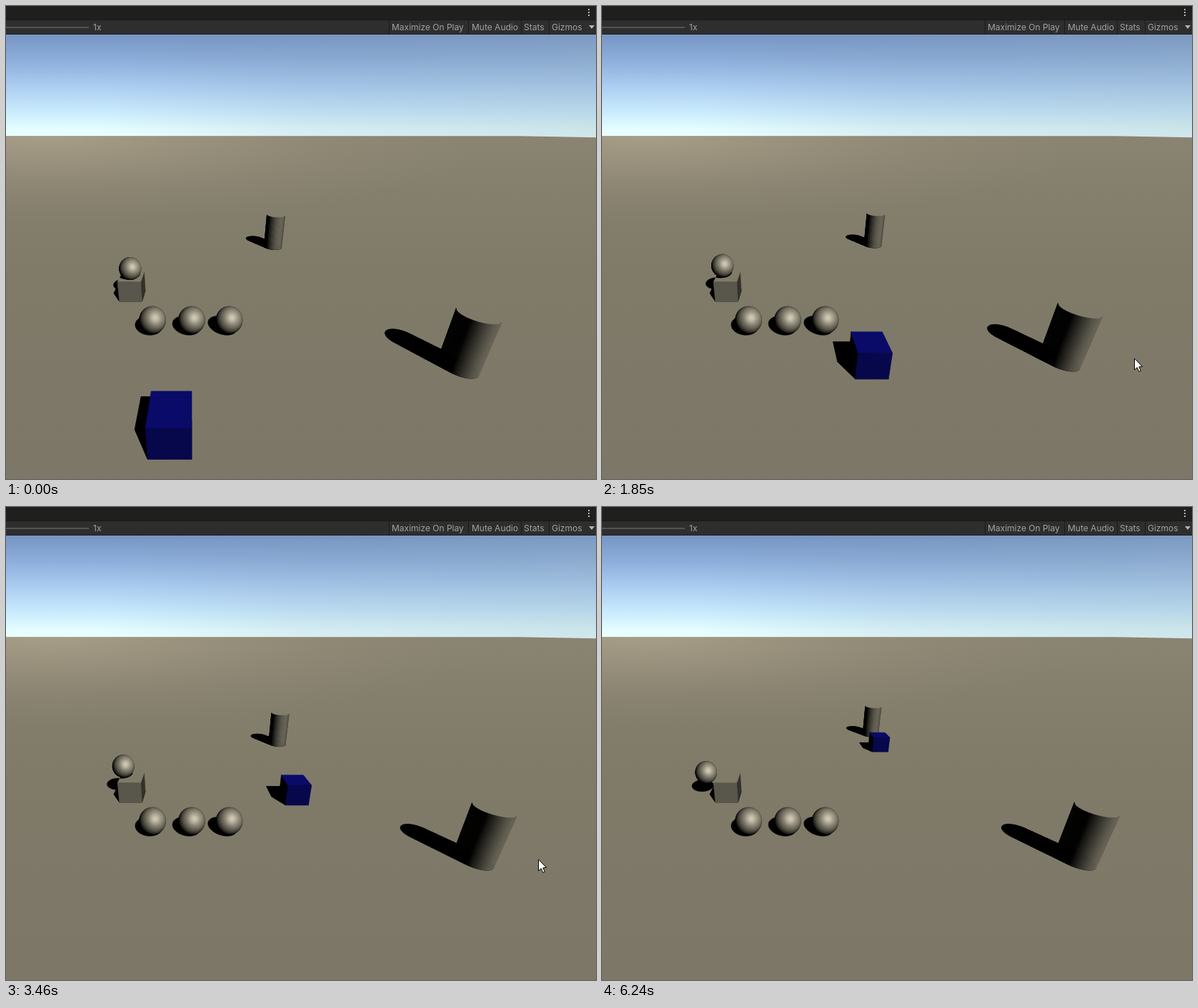
An HTML page with a canvas that plays this animation: 826 px wide and 663 px high, repeating every 6310 ms.

```html
<!DOCTYPE html>
<html lang="en">
<head>
<meta charset="utf-8">
<title>Game view</title>
<style>
  html, body { margin: 0; width: 100%; height: 100%; overflow: hidden; background: #1f1f1e; }
  #stage { position: relative; width: 826px; height: 663px; overflow: hidden; }
  canvas { position: absolute; left: 0; top: 0; }
  .bar { position: absolute; left: 0; top: 19px; width: 826px; height: 21px; background: #2e2e2e;
         border-top: 1px solid #191919; border-bottom: 1px solid #202020; box-sizing: border-box;
         font: 12px/20px Inter, sans-serif; color: #a2a2a2; white-space: nowrap; }
  .bar span { position: absolute; top: 0; }
  .bar i { position: absolute; top: 0; width: 1px; height: 19px; background: #1b1b1b; }
  .slider { position: absolute; left: 0; top: 9px; width: 116px; height: 2px; background: #535353; }
  .arrow { position: absolute; left: 815.5px; top: 7px; border: 4.5px solid transparent;
           border-top: 5px solid #b4b4b4; border-bottom: 0; }
  .dot { position: absolute; left: 815px; width: 2px; height: 2px; background: #b8b8b8; }
</style>
</head>
<body>
<div id="stage">
  <canvas id="view" width="826" height="663"></canvas>
  <b class="dot" style="top:4px"></b><b class="dot" style="top:8px"></b><b class="dot" style="top:12px"></b>
  <div class="bar">
    <div class="slider"></div>
    <span style="left:122px">1x</span>
    <i style="left:536px"></i><span style="left:540px">Maximize On Play</span>
    <i style="left:647px"></i><span style="left:652px">Mute Audio</span>
    <i style="left:721px"></i><span style="left:725px">Stats</span>
    <i style="left:760px"></i><span style="left:764px">Gizmos</span>
    <div class="arrow"></div>
  </div>
</div>
<script>
const LOOP = 6310, STEP = 77, LAST = 81;
const W = 826, H = 663, HORIZON = 182;
const LIGHT = [0.321, 0.766, -0.557];
const GRAY = [160, 154, 134], BLUE = [13, 13, 136], TOP_GRAY = '#807a69';
const ctx = document.getElementById('view').getContext('2d');

// Tracks: [time, x, z]
const cubeTrack = [[700, -1, 4.64], [1380, 0.89, 6.26], [2310, 3.17, 7.77], [2770, 3.75, 8.82],
  [3460, 4.08, 11.28], [4920, 5.43, 16.72], [5400, 5.4, 17.74]];
const nearTrack = [[700, 8.45, 7.54], [1380, 8.67, 7.74], [2310, 9.07, 7.92], [2770, 9.27, 7.92],
  [3500, 9.27, 7.92], [4150, 9.47, 7.92]];
const farTrack = [[700, 5.36, 18.49], [1380, 5.58, 18.75], [2310, 5.81, 18.87], [3460, 5.85, 19.27],
  [4920, 6.18, 20.85], [5400, 6.2, 21.3]];
// Ball: [time, x, height, z]
const ballTrack = [[0, -2.74, 1.38, 12.1], [400, -2.78, 1.5, 12.1], [1380, -2.86, 1.5, 12.15],
  [2310, -2.96, 1.5, 12.18], [3460, -3.06, 1.5, 12.22], [5163, -3.2, 1.5, 12.3]];
const mouseTrack = [[300, 763, 663], [690, 681.5, 538], [800, 681.5, 538], [1300, 730.5, 497],
  [1400, 730.5, 497], [1700, 745.5, 494], [5850, 745.5, 494], [6080, 748, 640]];

function at(track, t) {
  let i = 0;
  while (i < track.length - 1 && track[i + 1][0] <= t) i++;
  const a = track[i], b = track[i + 1] || a;
  const k = b === a ? 0 : Math.max(0, (t - a[0]) / (b[0] - a[0]));
  return a.slice(1).map((v, j) => v + (b[j + 1] - v) * k);
}

function project(x, y, z) {
  const down = 7.128 - y, w = z + 0.362 * down;
  return [260 + 446 * x / w, HORIZON + 459 * down / w, w];
}

// Point cast along the light onto a level plane
const cast = (x, y, z, level = 0) => project(x - 0.42 * (y - level), level, z + 0.727 * (y - level));

function shade(rgb, nx, ny, nz) {
  const k = Math.max(0, LIGHT[0] * nx + LIGHT[1] * ny + LIGHT[2] * nz);
  return `rgb(${rgb.map(c => Math.round(c * k))})`;
}

function trace(points) {
  ctx.beginPath();
  points.forEach(p => ctx.lineTo(p[0], p[1]));
  ctx.closePath();
}

function poly(points, color) {
  trace(points);
  ctx.fillStyle = ctx.strokeStyle = color;
  ctx.lineWidth = 0.6;
  ctx.fill();
  ctx.stroke();
}

const ring = (n, fn) => Array.from({ length: n }, (_, i) => fn(i / n * Math.PI * 2));

function makeCube(x, z, rgb, topColor) {
  const corners = [[x, z], [x + 1, z], [x + 1, z + 1], [x, z + 1]];
  const wall = (map, i) => {
    const a = corners[i], b = corners[(i + 1) % 4];
    return [map(a[0], 0, a[1]), map(b[0], 0, b[1]), map(b[0], 1, b[1]), map(a[0], 1, a[1])];
  };
  const lid = map => corners.map(c => map(c[0], 1, c[1]));
  const flat = (a, b, c) => cast(a, b, c);
  return {
    z,
    shadow() {
      for (let i = 0; i < 4; i++) poly(wall(flat, i), '#000');
      poly(lid(flat), '#000');
    },
    draw() {
      if (x > 0) poly(wall(project, 3), shade(rgb, -1, 0, 0));
      if (x + 1 < 0) poly(wall(project, 1), shade(rgb, 1, 0, 0));
      poly(lid(project), topColor || shade(rgb, 0, 1, 0));
      poly(wall(project, 0), shade(rgb, 0, 0, -1));
    },
    lid: () => lid(project)
  };
}

function makeCylinder([x, z], size) {
  const r = size / 2, h = size * 2, n = 72;
  const strip = (map, a) => {
    const b = a + Math.PI * 2 / n;
    const p = (ang, y) => map(x + r * Math.cos(ang), y, z + r * Math.sin(ang));
    return [p(a, 0), p(b, 0), p(b, h), p(a, h)];
  };
  const flat = (a, b, c) => cast(a, b, c);
  return {
    z,
    shadow() {
      ring(n, a => poly(strip(flat, a), '#000'));
      poly(ring(n, a => cast(x + r * Math.cos(a), h, z + r * Math.sin(a))), '#000');
    },
    draw() {
      ring(n, a => {
        const m = a + Math.PI / n, c = Math.cos(m), s = Math.sin(m);
        if (c * (x + r * c) + s * (z + r * s) < 0) poly(strip(project, a), shade(GRAY, c, 0, s));
      });
    }
  };
}

function ballSprite(size) {
  const c = document.createElement('canvas');
  c.width = c.height = size;
  const g = c.getContext('2d'), img = g.createImageData(size, size), half = size / 2;
  for (let i = 0; i < size * size; i++) {
    const x = (i % size + 0.5 - half) / half, y = (half - 0.5 - Math.floor(i / size)) / half;
    const d = x * x + y * y, z = Math.sqrt(Math.max(0, 1 - d));
    const lit = Math.max(0, 0.321 * x + 0.252 * y + 0.91 * z);
    const gloss = 50 * Math.pow(Math.max(0, 0.164 * x + 0.129 * y + 0.978 * z), 14);
    GRAY.forEach((v, j) => { img.data[i * 4 + j] = v * lit + gloss; });
    img.data[i * 4 + 3] = 255 * Math.min(1, Math.max(0, (1 - Math.sqrt(d)) * half));
  }
  g.putImageData(img, 0, 0);
  return c;
}
const sprite = ballSprite(96);

function makeBall(x, y, z) {
  const outline = level => ring(40, a => {
    const c = Math.cos(a) / 2, s = Math.sin(a) / 2;
    return cast(x + c * 0.866 + s * 0.383, y - s * 0.643, z + c * 0.5 - s * 0.663, level);
  });
  return {
    z,
    shadow() { poly(outline(0), '#000'); },
    shadowOn(box) {
      ctx.save();
      trace(box.lid());
      ctx.clip();
      poly(outline(1), '#000');
      ctx.restore();
    },
    draw() {
      const [px, py, w] = project(x, y, z), rx = 226 / w, ry = rx * 1.03;
      ctx.drawImage(sprite, px - rx, py - ry, rx * 2, ry * 2);
    }
  };
}

function gradient(g, stops) {
  stops.forEach(([p, c]) => g.addColorStop(p, c));
  return g;
}

function makeBackdrop() {
  const c = document.createElement('canvas');
  c.width = W;
  c.height = H;
  const g = c.getContext('2d');
  g.fillStyle = '#1f1f1e';
  g.fillRect(0, 0, W, 40);
  g.fillStyle = gradient(g.createLinearGradient(0, 40, 0, 184), [[0, '#7695c4'], [0.25, '#8daeda'],
    [0.5, '#abcdf1'], [0.75, '#caebfd'], [0.92, '#e4feff'], [1, '#ecffff']]);
  g.fillRect(0, 40, W, 146);
  g.fillStyle = gradient(g.createLinearGradient(150, 0, W, 60), [[0, 'rgba(126,150,176,0)'],
    [0.4, 'rgba(126,150,176,.16)'], [1, 'rgba(140,166,180,.28)']]);
  g.fillRect(0, 40, W, 146);

  g.beginPath();
  [[0, 182.3], [718, 182.3], [W, 184.3], [W, H], [0, H]].forEach(p => g.lineTo(...p));
  g.closePath();
  g.fillStyle = gradient(g.createLinearGradient(0, HORIZON, 0, H), [[0, '#8a8472'], [0.15, '#857f6e'],
    [0.4, '#807a69'], [0.75, '#7e7868'], [1, '#7d7767']]);
  g.fill();
  g.save();
  g.clip();
  g.translate(0, HORIZON);
  g.scale(1, 0.2);
  g.fillStyle = gradient(g.createRadialGradient(60, 0, 0, 60, 0, 620), [[0, 'rgba(178,168,144,.72)'],
    [0.3, 'rgba(174,164,140,.45)'], [0.65, 'rgba(168,158,134,.17)'], [1, 'rgba(160,150,128,0)']]);
  g.fillRect(0, 0, W, 2400);
  g.restore();
  return c;
}
const backdrop = makeBackdrop();

const box = makeCube(-3.2, 11.52, GRAY, TOP_GRAY);
const row = [-1.45, 0, 1.39].map(x => makeBall(x, 0.5, 9.39));

function ballAt(t) {
  let [x, y, z] = at(ballTrack, t);
  const s = (t - 5163) / 1000;
  if (s > 0) {
    // Tips over the edge of the box like an inverted pendulum
    const a = 0.046 * Math.sinh(3.74 * s);
    x -= 0.53 * Math.sin(a);
    y = 1 + 0.5 * Math.cos(a);
  }
  return makeBall(x, y, z);
}

function drawMouse(t) {
  if (t < 300 || t > 6080) return;
  const [x, y] = at(mouseTrack, t);
  trace([[0, 0], [0, 16], [3.7, 12.7], [6.3, 18.5], [8.8, 17.4], [6.3, 11.8], [11, 11.4]]
    .map(p => [p[0] + x, p[1] + y]));
  ctx.fillStyle = '#fff';
  ctx.strokeStyle = '#000';
  ctx.lineWidth = 1;
  ctx.fill();
  ctx.stroke();
}

function render(t) {
  ctx.drawImage(backdrop, 0, 0);
  const ball = ballAt(t);
  const things = [
    makeCylinder(at(farTrack, t), 1.1), makeCylinder(at(nearTrack, t), 1),
    makeCube(...at(cubeTrack, t), BLUE), box, ball, ...row
  ].sort((a, b) => b.z - a.z);
  things.forEach(o => o.shadow());
  things.filter(o => o !== ball).forEach(o => {
    o.draw();
    if (o === box) {
      ball.shadowOn(box);
      ball.draw();
    }
  });
  drawMouse(t);
}

let shown = -1;
const start = performance.now();
function tick() {
  const t = (performance.now() - start) % LOOP;
  const step = Math.min(LAST, Math.floor((t + 11) / STEP));
  if (step !== shown) render((shown = step) * STEP);
  requestAnimationFrame(tick);
}
tick();
</script>
</body>
</html>
```
